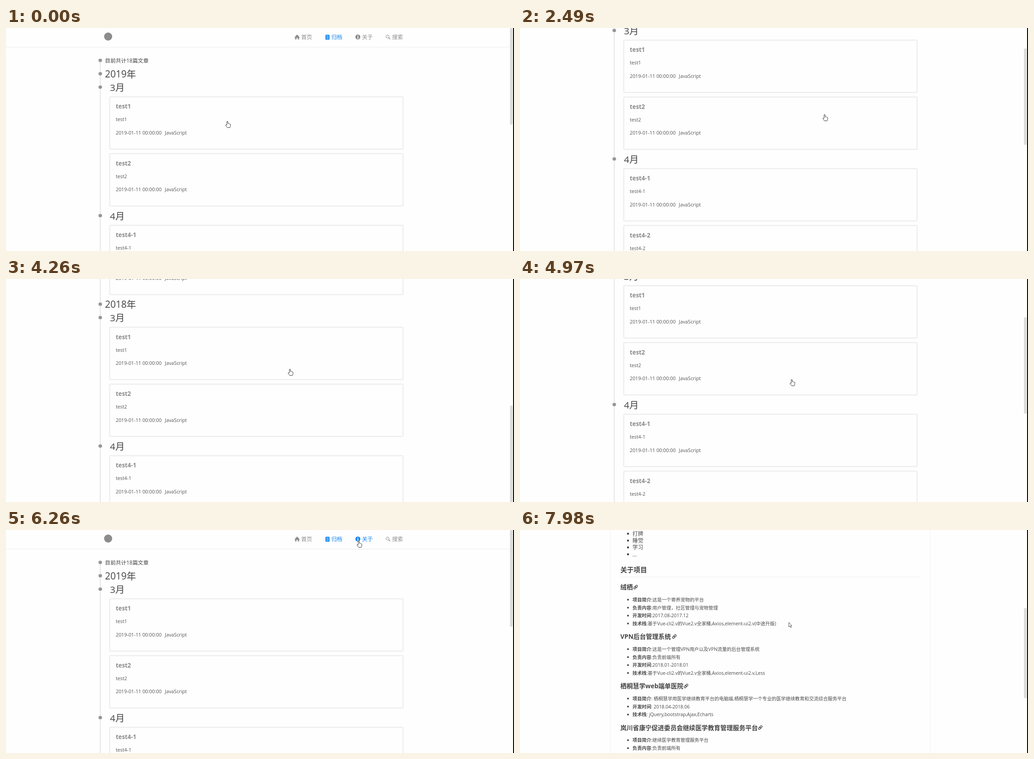
Animation, 1129 px wide and 496 px high, one loop 8000 ms. Source, as an HTML page:

```html
<!DOCTYPE html>
<html lang="zh">
<head>
<meta charset="utf-8">
<style>
html, body { margin: 0; width: 100%; height: 100%; overflow: hidden; background: #fefefe; }
svg { display: block; }
text { font-family: "Open Sans", "Noto Sans CJK SC", sans-serif; white-space: pre; }
.nav { color: #8c8c8c; }
.nav.on { color: #1286f0; }
</style>
</head>
<body>
<svg id="stage" width="1129" height="496" viewBox="0 0 1129 496"></svg>
<script>
const LOOP = 8000, SWITCH = 6730;
const stage = document.getElementById('stage');

// y is the vertical middle of the line
const text = (x, y, s, size, fill = '#555', extra = '') =>
  `<text x="${x}" y="${y + size * 0.37}" font-size="${size}" fill="${fill}" ${extra}>${s}</text>`;
const bold = (x, y, s, size, fill = '#444', extra = '') =>
  text(x, y, s, size, fill, 'font-weight="700" ' + extra);
const rule = (x, y, w) => `<rect x="${x}" y="${y}" width="${w}" height="1" fill="#ececec"/>`;

// ---- header ----
const icons = [
  '<path d="M-6 1 0-5.5 6 1H4.5V5.5H1.5V2H-1.5V5.5H-4.5V1Z" fill="currentColor"/>',
  '<rect x="-4" y="-5" width="9" height="11" rx="1.5" fill="currentColor"/>' +
    '<path d="M-2-2.5H3M-2 .5H3M-2 3.5H3" stroke="#fff"/>',
  '<circle r="5.5" fill="currentColor"/><path d="M0-3.5V-1.8M-1-.5H.3V3M-1.3 3H1.5" stroke="#fff" stroke-width="1.4" fill="none"/>',
  '<circle cx="-1" cy="-1" r="3.4" fill="none" stroke="currentColor"/><path d="M1.5 1.5 5 5" stroke="currentColor" stroke-width="1.4"/>'
];
const navX = [647, 714, 782, 849];
const nav = ['首页', '归档', '关于', '搜索'].map((s, i) =>
  `<g class="nav"><g transform="translate(${navX[i]} 20)">${icons[i]}</g>${text(navX[i] + 9.3, 21, s, 12, 'currentColor')}</g>`);
const header = '<circle cx="227" cy="19" r="9" fill="#8c8c8c"/>' + nav.join('') + rule(0, 42, 1120);

// ---- archive page ----
const dot = y => `<ellipse cx="209.5" cy="${y}" rx="4" ry="3.7" fill="#969696"/>`;
const cardTops = [];
function card(y, name) {
  cardTops.push(y);
  return `<rect x="230.5" y="${y}" width="652" height="116.5" rx="2" fill="none" stroke="#f4f4f4" stroke-width="3"/>
    <rect x="231" y="${y + .5}" width="651" height="115.5" rx="1" fill="#fefefe" stroke="#e6e6e6"/>` +
    bold(244, y + 21.5, name, 13.3, '#8a8a8a') + text(244, y + 50.5, name, 10.8) +
    text(244, y + 80, '2019-01-11 00:00:00', 10.8) + text(353, y + 80, 'JavaScript', 10.8);
}
const month = (y, n, names) => dot(y) + text(231, y + 1, n + '月', 20.8, '#444') +
  names.map((s, i) => card(y + 21.5 + i * 126.5, s)).join('');
const year = (y, n) => dot(y) + text(220, y + .5, n + '年', 21, '#444') +
  month(y + 29.7, 3, ['test1', 'test2']) + month(y + 315.5, 4, ['test4-1', 'test4-2']);
const archive = '<rect x="208.5" y="72" width="2" height="1300" fill="#e4e4e4"/>' +
  dot(72) + text(220, 73, '目前共计18篇文章', 11.9, '#444') + year(101.7, 2019) + year(703, 2018);

// ---- about page ----
const bullet = (y, s, size) => `<circle cx="240" cy="${y}" r="${size / 5.2}" fill="#444"/>` + text(250, y, s, size, '#4a4a4a');
const list = (y, step, size, items) => items.map((s, i) => bullet(y + i * step, s, size)).join('');
const link = (x, y) => `<g transform="translate(${x} ${y}) rotate(-45)" fill="none" stroke="#444" stroke-width="1.3">
  <rect x="-5" y="-2" width="5.6" height="4" rx="2"/><rect x="-.6" y="-2" width="5.6" height="4" rx="2"/></g>`;
const project = (y, name, linkX, items) => bold(223, y, name, 13.9) + link(linkX, y) +
  list(y + 28, 17.7, 10.4, items.map(([k, v]) => `<tspan font-weight="700">${k}</tspan>:${v}`));
const mid = 'text-anchor="middle"';
const about = '<rect x="200.5" y="64.5" width="711" height="1130" fill="#fefefe" stroke="#efefef"/>' +
  bold(556, 101, '关于我', 19.4, '#000', mid) + bold(556, 128, 'Welcome to my home', 12.1, '#444', mid) +
  bold(223, 163, '我的简历', 14.8) + rule(223, 178, 665) +
  ['我叫江禾松,1997年的老腊肉', '2018年6月毕业于四川工商职业技术学院，软件技术专业', '从事前端开发近两年时间',
    '曾就职于云州棠雀科技,岚川栖桐网络科技有限公司'].map((s, i) => text(223, 199 + i * 15.4, s, 11.9)).join('') +
  bold(223, 278, '技术栈', 12) +
  list(304.7, 15.4, 12.2, ['JavaScript', 'Vue', 'React', 'HTML/CSS', 'node的express', 'MySQL']) +
  bold(223, 414.5, '兴趣爱好', 12) +
  list(441, 15.3, 12, ['MOQ,吃鸡', '骑车', '羽毛球', '乒乓球', '打牌', '睡觉', '学习', '...']) +
  bold(223, 582.5, '关于项目', 14.8) + rule(223, 598, 665) +
  project(621, '绒栖', 257, [['项目简介', '这是一个寄养宠物的平台'], ['负责内容', '用户管理，社区管理与宠物管理'],
    ['开发时间', '2017.08-2017.12'], ['技术栈', '基于Vue-cli2.v的Vue2.v全家桶,Axios,element-ui2.v(中途升版)']]) +
  project(731, 'VPN后台管理系统', 343, [['项目简介', '这是一个管理VPN用户以及VPN流量的后台管理系统'],
    ['负责内容', '负责前端所有'], ['开发时间', '2018.01-2018.01'], ['技术栈', '基于Vue-cli2.v的Vue2.v全家桶,Axios,element-ui2.v,Less']]) +
  project(841, '栖桐慧学web端单医院', 369, [['项目简介', ' 栖桐慧学用医学继续教育平台的电脑端,栖桐慧学一个专业的医学继续教育和交流综合服务平台'],
    ['开发时间', ' 2018.04-2018.06'], ['技术栈', ' jQuery,bootstrap,Ajax,Echarts']]) +
  project(933.5, '岚川省康宁促进委员会继续医学教育管理服务平台', 534, [['项目简介', '继续医学教育管理服务平台'], ['负责内容', '负责前端所有']]);

// ---- cursors, with the hot spot at 0,0 ----
const cursors = {
  hand: '<path d="M-1.2 9V1.2Q0-.6 1.2 1.2V5.5Q2.6 4.6 3.4 6 4.8 5.3 5.4 6.7 6.8 6.4 6.8 8V10.5Q6.8 12.5 5.5 14.5H-.2Q-2-.0 -2 12L-4 9.3Q-3.6 7.4-1.2 9Z" fill="#fff" stroke="#333"/>'
    .replace('Q-2-.0 -2 12', 'Q-1.4 13.4-2 12'),
  arrow: '<path d="M.5.5V10.5L2.8 8.5 4.4 12 6 11.3 4.4 8H7.3Z" fill="#fff" stroke="#555"/>',
  beam: '<path d="M-2.5-5H-.8L0-4.2.8-5H2.5M0-4.2V4.2M-2.5 5H-.8L0 4.2.8 5H2.5" fill="none" stroke="#444"/>'
};

stage.innerHTML = `<g id="page"><g id="archive">${archive}</g><g id="about">${about}</g>${header}</g>
  <rect id="bar" x="1120" width="6" rx="3" fill="#dcdcdc"/><rect x="1127" width="2" height="496"/>
  <g id="cursor">${Object.entries(cursors).map(([k, v]) => `<g id="${k}">${v}</g>`).join('')}</g>`;
const $ = id => document.getElementById(id);
const show = (id, on) => $(id).setAttribute('display', on ? 'inline' : 'none');
const navItems = document.querySelectorAll('.nav');

// ---- motion: [time, value...] ----
const archiveScroll = [[2000, 0], [2400, 100], [2720, 190], [3045, 433], [3120, 495], [3190, 495], [3420, 648],
  [4260, 648], [4650, 330], [4800, 330], [4895, 196], [4970, 138], [5050, 138], [5270, 60], [5410, 50], [5650, 0]];
const aboutScroll = [[7360, 0], [7430, 10], [7520, 10], [7905, 425], [7980, 494]];
const pointer = [[0, 492, 207], [390, 488, 200], [690, 488, 200], [1100, 450, 186], [1470, 442, 201],
  [1600, 560, 170], [1780, 776, 176], [2000, 776, 176], [2720, 631, 200], [4260, 631, 200], [4800, 604, 223],
  [5410, 604, 223], [6180, 760, 40], [6260, 784, 24], [6330, 784, 24], [6410, 792, 10], [6580, 793, 11],
  [7130, 793, 11], [7430, 617, 122], [7520, 617, 122], [7980, 597, 205]];

function at(keys, t) {
  const i = keys.findIndex(k => k[0] > t);
  if (i < 0) return keys[keys.length - 1].slice(1);
  if (i === 0) return keys[0].slice(1);
  const a = keys[i - 1], b = keys[i], p = (t - a[0]) / (b[0] - a[0]);
  return a.slice(1).map((v, j) => v + (b[j + 1] - v) * p);
}

function draw(t) {
  const onAbout = t >= SWITCH, keys = onAbout ? aboutScroll : archiveScroll;
  const [scroll] = at(keys, t), [x, y] = at(pointer, t), py = y + scroll;
  show('archive', !onAbout);
  show('about', onAbout);
  $('page').setAttribute('transform', `translate(0 ${-Math.round(scroll)})`);

  // the scrollbar trails the content slightly
  $('bar').setAttribute('y', at(keys, t - 75)[0] * (onAbout ? 0.407 : 0.434));
  $('bar').setAttribute('height', onAbout ? 201 : 215);

  const hover = py > 8 && py < 34 ? navX.findIndex(n => x > n - 7 && x < n + 34) : -1;
  navItems.forEach((n, i) => n.classList.toggle('on', i === hover || i === (onAbout ? 2 : 1)));

  const onCard = !onAbout && x > 231 && x < 882 && cardTops.some(c => py > c && py < c + 116);
  const onTitle = onAbout && x > 490 && x < 623 && py > 118 && py < 140;
  const kind = hover >= 0 || onCard ? 'hand' : onTitle ? 'beam' : 'arrow';
  for (const k in cursors) show(k, k === kind);
  $('cursor').setAttribute('transform', `translate(${Math.round(x)} ${Math.round(y)})`);
}

const start = performance.now();
function tick() {
  draw((performance.now() - start) % LOOP);
  requestAnimationFrame(tick);
}
tick();
</script>
</body>
</html>
```
